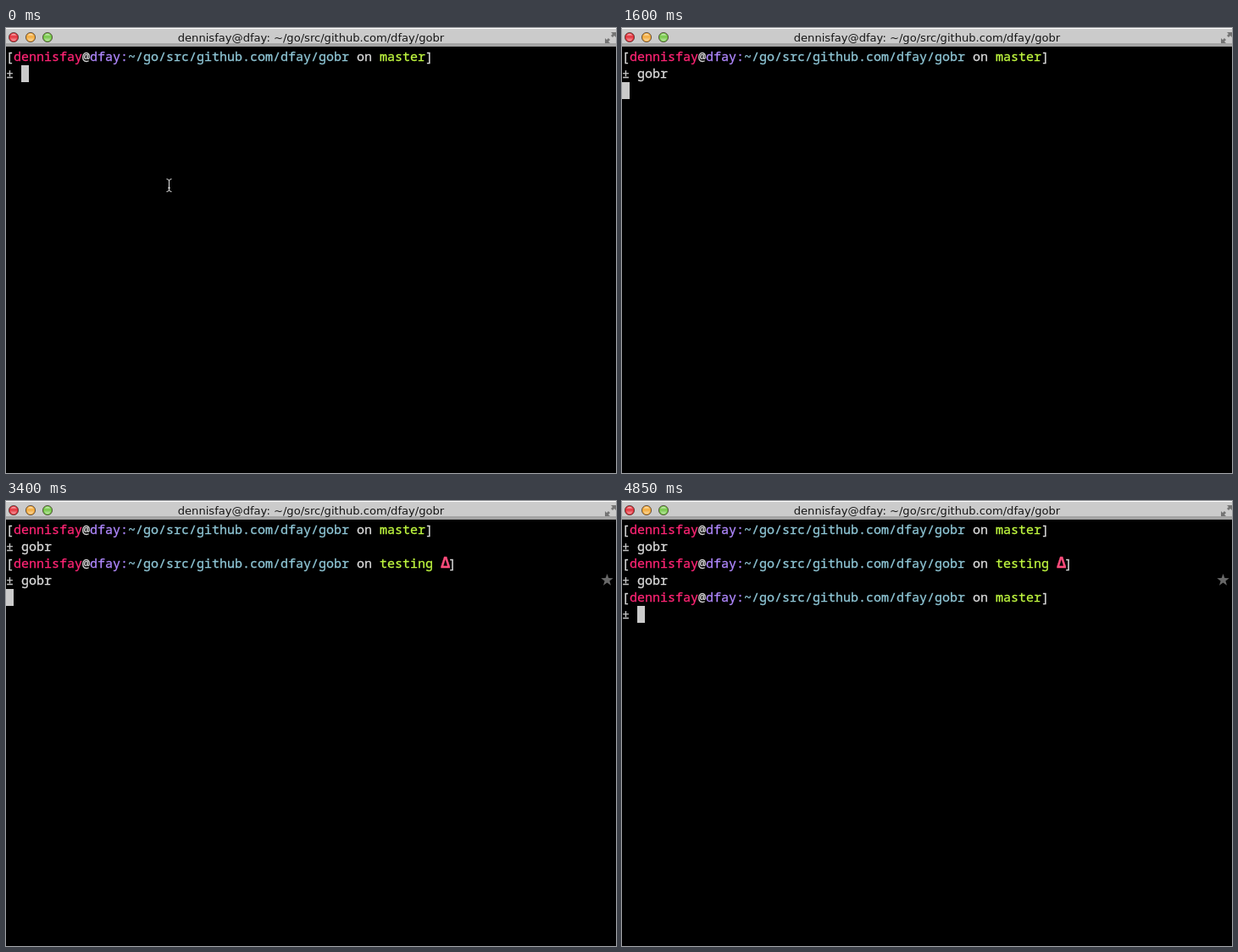
Recreate the animation shown at these times as an HTML page. Size 720 by 526 pixels, loop 5.55 s.

```html
<!DOCTYPE html>
<html lang="en">
<head>
<meta charset="utf-8">
<title>Terminal</title>
<style>
html, body { margin: 0; width: 100%; height: 100%; overflow: hidden; background: #000; }
svg { display: block; width: 720px; height: 526px; }
text { white-space: pre; }
.term { font: 15px "Noto Sans Mono", "DejaVu Sans Mono", monospace; color: #dcdcdc; }
.term text, .term tspan { fill: currentColor; stroke: currentColor; stroke-width: .3px; }
.title { font: 13.1px "DejaVu Sans", "Open Sans", sans-serif; fill: #161616; text-anchor: middle; }
.term .user { color: #ff2474; }
.term .host { color: #b088ff; }
.term .path { color: #90c8d8; }
.term .branch { color: #c2fa40; }
.term .dirty { color: #ff4c7c; font-size: 18px; font-weight: 600; }
.term .sign { color: #c4c4c4; }
.term .picked { color: #000; }
.block { fill: #cbcbcb; }
</style>
</head>
<body>
<svg viewBox="0 0 720 526">
  <defs>
    <linearGradient id="gloss" x2="0" y2="1">
      <stop offset="0" stop-color="#fff" stop-opacity=".7"/>
      <stop offset=".4" stop-color="#fff" stop-opacity=".05"/>
      <stop offset="1" stop-color="#fff" stop-opacity=".55"/>
    </linearGradient>
  </defs>

  <rect width="720" height="22" fill="#a4a4a4"/>
  <rect width="720" height="18" fill="#cbcbcb"/>
  <rect width="720" height="1" fill="#fff"/>
  <g id="lights"></g>
  <g fill="#747474">
    <path d="M714 5h6v6l-2-2-2 2-2-2 2-2z"/>
    <path d="M707 12l2 2 2-2 2 2-2 2 2 2h-6z"/>
  </g>

  <g data-on="0-700 1350-3000 3250-5550">
    <text class="title" x="360" y="16">dennisfay@dfay: ~/go/src/github.com/dfay/gobr</text>
    <g class="term" id="shell"></g>
    <path data-on="1700-5550" fill="#686868" d="M709.5 86l1.8 5.1 5.4.1-4.3 3.3 1.6 5.2-4.5-3.1-4.5 3.1 1.6-5.2-4.3-3.3 5.4-.1z"/>
    <rect id="cursor" class="block" width="9" height="20"/>
  </g>

  <g data-on="700-1350 3000-3250">
    <text class="title" x="360" y="16">gobr</text>
    <g class="term">
      <text y="39">master</text>
      <text y="59">testing</text>
      <g data-on="700-1150 3000-3250">
        <rect class="block" y="24" width="54" height="20"/>
        <text class="picked" y="39">master</text>
      </g>
      <g data-on="1150-1350">
        <rect class="block" y="44" width="63" height="20"/>
        <text class="picked" y="59">testing</text>
      </g>
    </g>
  </g>

  <path id="mouse" fill="none" stroke="#e4e4e4"
        d="M-3-7.5Q0-7.5 0-5Q0-7.5 3-7.5M0-5V5M-3 7.5Q0 7.5 0 5Q0 7.5 3 7.5M-1.5 3H1.5"/>
</svg>
<script>
const LOOP = 5550, COL = 9, ROW = 20, TOP = 24;
const $ = id => document.getElementById(id);

$('lights').innerHTML = ['#e2242f', '#f2a630', '#6cc43c'].map((c, i) => {
  const at = `cx="${9 + i * 20}" cy="11"`;
  return `<circle ${at} r="5.6" fill="${c}" stroke="#4a3c38" stroke-opacity=".8"/>
    <circle ${at} r="4.2" fill="url(#gloss)"/>`;
}).join('');

// Each prompt: when it shows, its branch, the key times and when Enter moves on.
const prompts = [
  { start: 0, branch: 'master', keys: [100, 250, 350, 500], enter: 1350 },
  { start: 1700, branch: 'testing', dirty: true, keys: [2500, 2600, 2750, 2850], enter: 3250 },
  { start: 3450, branch: 'master', keys: [], enter: LOOP }
];

const span = (cls, s) => `<tspan class="${cls}">${s}</tspan>`;
const baseline = row => TOP + row * ROW + 15;

$('shell').innerHTML = prompts.map((p, i) => {
  const head = '[' + span('user', 'dennisfay') + '@' + span('host', 'dfay:') +
    span('path', '~/go/src/github.com/dfay/gobr') + ' on ' + span('branch', p.branch) +
    (p.dirty ? ' ' + span('dirty', 'Δ') + '<tspan dx="-1.8">]</tspan>' : ']');
  return `<g data-on="${p.start}-${LOOP}">
    <text y="${baseline(i * 2)}">${head}</text>
    <text class="sign" y="${baseline(i * 2 + 1)}">±</text>
    <text class="typed" x="${2 * COL}" y="${baseline(i * 2 + 1)}"></text></g>`;
}).join('');

const typed = [...document.querySelectorAll('.typed')];
const timed = [...document.querySelectorAll('[data-on]')].map(el => ({
  el, spans: el.dataset.on.split(' ').map(s => s.split('-').map(Number))
}));
const show = (el, on) => el.setAttribute('display', on ? 'inline' : 'none');

function drawShell(t) {
  let col = 0, row = 0;
  prompts.forEach((p, i) => {
    const n = p.keys.filter(k => t >= k).length;
    typed[i].textContent = 'gobr'.slice(0, n);
    if (t < p.start) return;
    row = i * 2 + 1;
    col = 2 + n;
    if (t >= p.enter) { row++; col = 0; }
  });
  $('cursor').setAttribute('x', col * COL);
  $('cursor').setAttribute('y', TOP + row * ROW);
}

function drawMouse(t) {
  const leaving = t >= 3850 && t < 4000;
  show($('mouse'), t < 100 || leaving);
  const k = leaving ? Math.floor((t - 3850) / 50) : 0;
  const [x, y] = leaving ? [199.5 + 50 * k * k, 164 - 30 * k * k] : [192.5, 186];
  $('mouse').setAttribute('transform', `translate(${x} ${y})`);
}

const began = performance.now();
function frame() {
  const t = (performance.now() - began) % LOOP;
  timed.forEach(({ el, spans }) => show(el, spans.some(([a, b]) => t >= a && t < b)));
  drawShell(t);
  drawMouse(t);
  requestAnimationFrame(frame);
}
frame();
</script>
</body>
</html>
```
